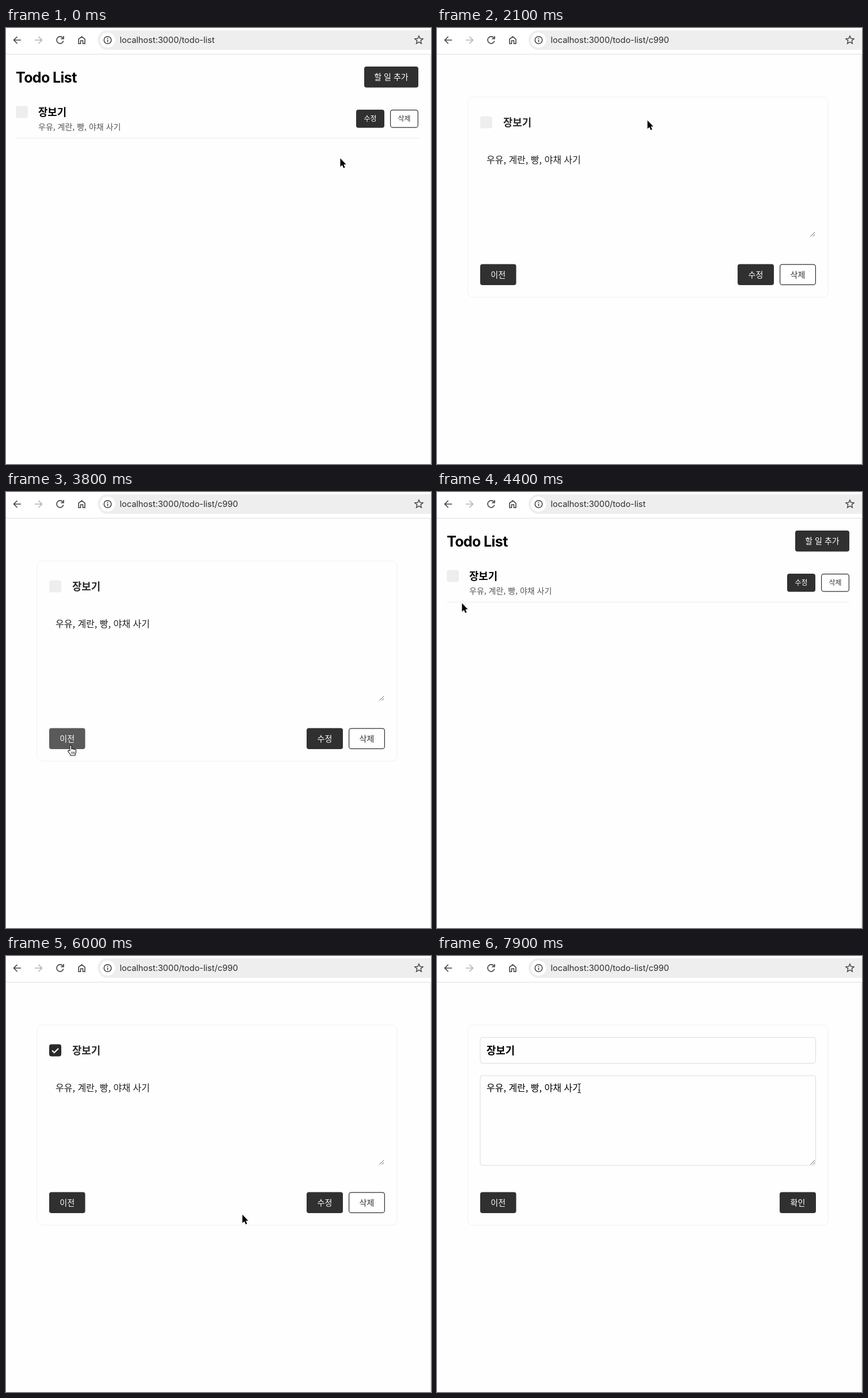
An HTML page for the animation above (8 s loop, 738 by 758 pixels).

```html
<!DOCTYPE html>
<html lang="ko">
<head>
<meta charset="utf-8">
<title>Todo List</title>
<style>
html, body { margin: 0; width: 100%; height: 100%; overflow: hidden; background: #fefefe; }
svg { display: block; width: 738px; height: 758px; }
text { font-family: "Noto Sans CJK KR", "Noto Sans CJK", sans-serif; }
.latin { font-family: Inter, sans-serif; }
.icon { fill: none; stroke: #444; stroke-width: 1.6; }
</style>
</head>
<body>
<svg id="stage" viewBox="0 0 738 758"></svg>
<script>
const DARK = '#303030', LOOP = 8000, STEP = 100;

const rect = (x, y, w, h, r, attrs) =>
  `<rect x="${x}" y="${y}" width="${w}" height="${h}" rx="${r}" ${attrs}/>`;
const text = (x, y, size, str, attrs = '') =>
  `<text x="${x}" y="${y}" font-size="${size}" ${attrs}>${str}</text>`;

// Button with a centred label; solid or outlined
function button(x, y, w, h, size, label, solid = true, id = '') {
  const box = solid
    ? rect(x, y, w, h, 4, `fill="${DARK}" ${id && `id="${id}"`}`)
    : rect(x + .6, y + .6, w - 1.2, h - 1.2, 4, `fill="#fff" stroke="${DARK}" stroke-width="1.2"`);
  return box + text(x + w / 2, y + h / 2 + size * .37, size, label,
    `text-anchor="middle" font-weight="500" fill="${solid ? '#fff' : DARK}"`);
}

const checkbox = (x, y) => `
  ${rect(x, y, 21, 21, 4, 'fill="#eee"')}
  <g class="tick">
    ${rect(x - 1.3, y - 1.3, 23.6, 23.6, 5, 'class="ring" fill="none" stroke="#9cc4ea" stroke-width="2.6"')}
    ${rect(x, y, 21, 21, 4, 'fill="#2a2a2c"')}
    <path d="M${x + 5} ${y + 10.8}l3.8 3.8 7.2-7.4" fill="none" stroke="#fff" stroke-width="2.1"/>
  </g>`;

const toolbar = `
  <rect width="738" height="45" fill="#fff"/>
  <path d="M0 45.5H737.5V758" fill="none" stroke="#dedede"/>
  ${rect(159, 4, 600, 34, 17, 'fill="#eee"')}
  <g class="icon">
    <path d="M26 21H14M19.5 15L13.5 21L19.5 27"/>
    <path d="M50 21H62M56.500 15L62.500 21L56.500 27" stroke="#b4b4b4"/>
    <path d="M99 17.500A6 6 0 1 0 99.800 22.500M100 14V18.800H95.200"/>
    <path d="M126 19.300L131.500 15L137 19.300V27.300H133.500V22H129.500V27.300H126Z"/>
    <path d="M717 13.700l2 4.600 5 .5-3.800 3.300 1.200 4.900-4.400-2.600-4.400 2.600 1.200-4.900-3.800-3.300 5-.5z" stroke-width="1.400"/>
  </g>
  <circle cx="176.500" cy="21" r="13" fill="#fff"/>
  <circle cx="176.500" cy="21" r="6.300" class="icon" stroke-width="1.500"/>
  <path d="M176.500 20.300V24.500M176.500 17.300V18.900" stroke="#333" stroke-width="1.500"/>
  <text id="url" class="latin" x="197.500" y="26" font-size="14.500" fill="#2c2c2c"></text>`;

const listPage = `<g id="list">
  <text class="latin" x="17" y="94.500" font-size="25" font-weight="700" letter-spacing="-.6">Todo List</text>
  ${button(622, 67, 94, 36.5, 14, '할 일 추가')}
  ${checkbox(17, 135.5)}
  ${text(56, 152.5, 17.8, '장보기', 'font-weight="700"')}
  ${text(56, 177, 14, '우유, 계란, 빵, 야채 사기', 'fill="#555"')}
  ${button(608, 142, 49, 31.5, 12, '수정')}
  ${button(667, 142, 49, 31.5, 12, '삭제', false)}
  <path d="M17 191.500H716" stroke="#ebebeb"/>
</g>`;

const detailPage = `<g id="detail">
  ${rect(53.5, 120, 626, 348, 10, 'fill="#fefefe" stroke="#f0f0f0"')}
  <g id="form" fill="none" stroke="#dcdcdc">
    ${rect(75, 141.5, 582.5, 45, 4, '')}
    ${rect(75, 208, 582.5, 156, 4, '')}
  </g>
  <g id="view">
    ${checkbox(75, 153.5)}
    ${text(115, 170.5, 17.8, '장보기', 'font-weight="700" fill="#2a2a2a"')}
    ${button(522, 410.5, 63, 36.5, 14, '수정', true, 'edit')}
    ${button(595, 410.5, 63, 36.5, 14, '삭제', false)}
  </g>
  <g id="editor">
    ${text(86, 170.5, 17.8, '장보기', 'font-weight="700"')}
    ${button(595, 410.5, 63, 36.5, 14, '확인', true, 'ok')}
  </g>
  ${text(86, 235, 16, '우유, 계란, 빵, 야채 사기', 'id="memo"')}
  <path d="M648.500 362.500l7.500-7.500M652.500 362.500l3.500-3.500" stroke="#666" stroke-width="1"/>
  ${button(75, 410.5, 62.5, 36.5, 14, '이전', true, 'back')}
</g>`;

const cursors = `<g id="cursor">
  <path id="arrow" d="M.5.500V15.300L3.900 12.200L6.200 17.500L8.600 16.500L6.400 11.300H10.500Z"
    stroke="#fff" stroke-width="1.600" paint-order="stroke"/>
  <g id="hand" stroke="#111" stroke-width="1.100" stroke-linejoin="round" fill="#fff">
    <path d="M-1.600 10V1.500C-1.600-.3 1.300-.3 1.300 1.500V7C1.500 5.600 4 5.700 4 7.300C4.300 6.200 6.600 6.400 6.600 8C7 7.100 9 7.300 9 9V12C9 14 7.600 15 7.400 18H-.4C-.8 15.500-3 14-4.600 11.200C-5.400 9.600-3.800 8.600-2.800 9.600Z"/>
    <path d="M1.500 11.500V15.500M3.900 11.500V15.500M6.200 11.500V15.500" stroke-width=".9"/>
  </g>
  <g id="beam" fill="none">
    <path d="M-3-8Q0-8 0-5.500Q0-8 3-8M0-6V6M-3 8Q0 8 0 5.500Q0 8 3 8M-1.800 3H1.800" stroke="#fff" stroke-width="2.600"/>
    <path d="M-3-8Q0-8 0-5.500Q0-8 3-8M0-6V6M-3 8Q0 8 0 5.500Q0 8 3 8M-1.800 3H1.800" stroke="#222" stroke-width="1.200"/>
  </g>
</g>`;

const stage = document.getElementById('stage');
stage.innerHTML = toolbar + listPage + detailPage + cursors;
const el = id => document.getElementById(id);
const show = (node, on) => node.setAttribute('visibility', on ? 'inherit' : 'hidden');

const linear = u => u;
const easeOut = u => 1 - (1 - u) ** 2;
const smooth = u => u * u * (3 - 2 * u);

// Pointer path: time, x, y, easing towards this point
const path = [
  [0, 580, 226], [200, 447, 198, smooth], [300, 447, 198], [1200, 365, 167, easeOut],
  [1300, 365, 166], [1400, 365, 166], [1500, 365, 165], [1600, 365, 165],
  [1900, 364.5, 161], [2000, 364.5, 161], [2100, 365, 160], [2500, 365, 160],
  [3400, 114, 439, smooth], [3600, 112.5, 440], [3800, 112.5, 440],
  [4600, 30, 147, smooth], [5100, 30, 147], [5300, 236, 202],
  [5500, 290, 173, easeOut], [5800, 290, 173], [6000, 410, 449], [6200, 410, 449],
  [6500, 570, 432, easeOut], [6800, 570, 432], [7100, 199, 216, smooth],
  [7600, 264, 229, smooth], [7700, 264, 229], [7800, 281, 234], [7900, 247, 230], [LOOP, 247, 230]
];

function pointer(t) {
  const i = path.findIndex(p => p[0] > t);
  const [t0, x0, y0] = path[i - 1], [t1, x1, y1, ease = linear] = path[i];
  const u = ease((t - t0) / (t1 - t0));
  return [x0 + (x1 - x0) * u, y0 + (y1 - y0) * u];
}

const clamp = v => Math.max(0, Math.min(1, v));
const ramp = (t, from, to) => clamp((t - from) / (to - from));
const within = (t, a, b) => t >= a && t < b;

function tint(id, hover) {
  const v = Math.round(48 + 42 * hover);
  el(id).setAttribute('fill', `rgb(${v},${v},${v})`);
}

function draw(ms) {
  const t = Math.floor(ms / STEP) * STEP;
  const detail = within(t, 2100, 3900) || t >= 5600;
  const editing = t >= 6700;
  const [x, y] = pointer(t);

  el('url').textContent = 'localhost:3000/todo-list' + (detail ? '/c990' : '');
  show(el('list'), !detail);
  show(el('detail'), detail);
  show(el('view'), detail && !editing);
  show(el('editor'), detail && editing);
  el('form').setAttribute('opacity', ramp(t, 6600, 6900));
  el('memo').setAttribute('fill', editing ? '#000' : '#222');
  for (const tick of stage.querySelectorAll('.tick'))
    tick.setAttribute('opacity', ramp(t, 4600, 4800));
  show(stage.querySelector('#view .ring'), false);

  tint('back', within(t, 3500, 3900) ? ramp(t, 3400, 3600) : 0);
  tint('edit', ramp(t, 6300, 6500));
  tint('ok', 1 - ramp(t, 6650, 6880));

  const hand = within(t, 3500, 3900) || within(t, 4600, 5200) || within(t, 6400, 6700);
  const beam = editing && y > 208 && y < 364;
  show(el('hand'), hand);
  show(el('beam'), beam);
  show(el('arrow'), !hand && !beam);
  el('cursor').setAttribute('transform', `translate(${x.toFixed(1)} ${y.toFixed(1)})`);
}

const start = performance.now();
function loop() {
  draw((performance.now() - start) % LOOP);
  requestAnimationFrame(loop);
}
draw(0);
loop();
</script>
</body>
</html>
```
